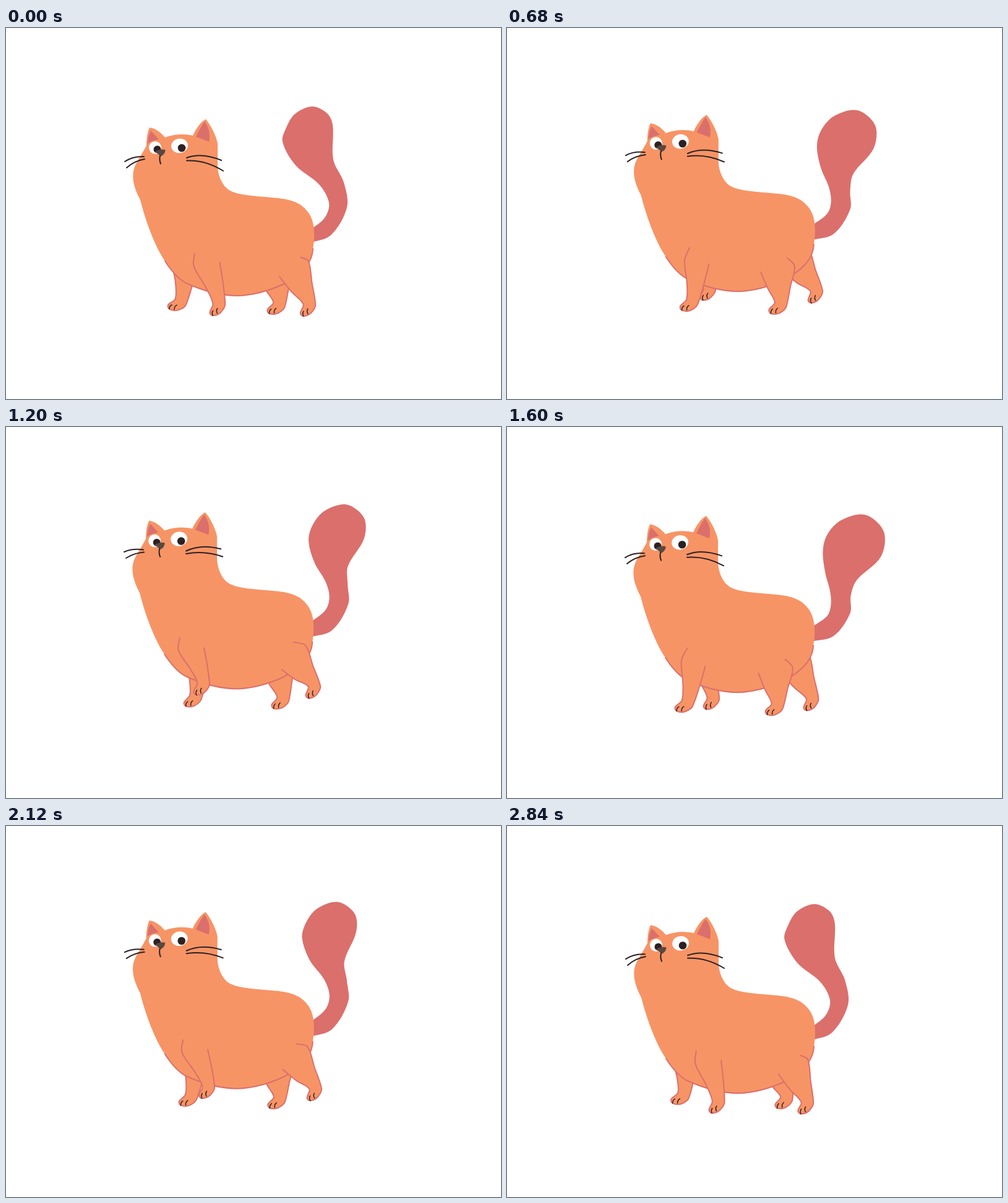
Recreate the animation shown at these times as an HTML page. Size 800 by 600 pixels, loop 2880 ms.

```html
<!DOCTYPE html>
<html lang="en">
<head>
<meta charset="utf-8">
<title>Walking cat</title>
<style>
  html, body { margin: 0; width: 100%; height: 100%; overflow: hidden; background: #fff; }
  svg { display: block; width: 100vw; height: 100vh; }
  .fur { fill: #f79465; }
  .pink { fill: #db6f6c; }
  .dark { fill: #2b2124; }
  .edge { stroke: #db6f6c; stroke-width: 2; stroke-linecap: round; stroke-linejoin: round; }
  .ink { fill: none; stroke: #2b2124; stroke-width: 2; stroke-linecap: round; }
  .claw { stroke-width: 1.5; }
  .line { fill: none; }
</style>
</head>
<body>
<svg viewBox="0 0 800 600">
  <g id="cat">
    <path id="tail" class="pink"/>
    <g id="farLegs"></g>
    <path class="fur" d="M232 161C229 167 227 178 227 190C222 200 214 212 209 222C202 237 205 256 217 278C227 318 243 357 257 377C266 391 276 404 290 412C318 425 345 433 375 433C400 432 425 425 449 414C470 402 495 385 496 357C500 335 499 310 487 296.500C476 281 456 276 430 274.200C400 271.500 378 271 362 263C348 255 342 235 342 222L342 187C340 175 331 157 323 147.500C315 151 307 163 302 174C290 171 272 171 257 177C251 170 242 162 232 161Z"/>
    <path class="edge line" d="M257 377C266 391 276 404 290 412C318 425 345 433 375 433C400 432 425 425 449 414C470 402 495 385 496 357"/>
    <path class="pink" d="M234 166C231 172 229 179 229 187C234 183 240 181 247 180C243 176 239 171 234 166ZM321 151C316 158 311 167 307 176C314 178 321 181 328 184C331 172 328 161 321 151Z"/>
    <ellipse cx="241" cy="193.500" rx="10" ry="10.300" fill="#fff"/>
    <ellipse cx="280.500" cy="190.500" rx="13.500" ry="11.700" fill="#fff" transform="rotate(-10 280.500 190.500)"/>
    <circle class="dark" cx="244.500" cy="196.300" r="6"/>
    <circle class="dark" cx="284" cy="194" r="6.300"/>
    <path d="M240.500 200.500C245 197 251 195.500 257.500 197C257.500 202 254 206.500 249.500 207.500C247 204 244 202 240.500 200.500Z" fill="#594841"/>
    <path class="ink" d="M249 206.500C248 211 248.500 216 250 219.500"/>
    <path id="whiskers" class="ink"/>
    <g id="nearLegs"></g>
  </g>
</svg>
<script>
const LOOP = 2880, STRIDE = 960, STEP = 40;

// Tail outline: each point swung fully left, then fully right
const TAIL = [
  [490,348, 490,352], [525,335, 530,345], [551,290, 557,316], [546,250, 560,295],
  [529,213, 578,274], [528,157, 631,241], [519,138, 640,193], [495,127, 608,161],
  [467,139, 565,169], [453,161, 540,193], [447,184, 533,221], [468,222, 531,254],
  [506,253, 529,285], [522,283, 525,304], [515,307, 519,316], [490,328, 490,333]
];
const PAW = [[-11, 10], [-10, 16], [0, 19], [10, 16], [17, 10]];
const CLAWS = [[[-5, 10], [-9, 12], [-9, 17]], [[3, 10], [-1, 12], [-1, 17]]];

// Whisker root, control point, tip, and the rise of the tip at full lift
const WHISKERS = [
  [[292, 210], [316, 201], [348, 214], 8],
  [[292, 214.5], [322, 213], [351, 231], 13],
  [[223, 208], [205, 207], [192, 216], 5],
  [[224, 212], [207, 215], [195, 226], 5]
];

const $ = id => document.getElementById(id);
const mix = (a, b, u) => a.map((v, k) => v + (b[k] - v) * u);
const shift = (p, x, y) => [p[0] + x, p[1] + y];
const dist = (a, b) => Math.hypot(a[0] - b[0], a[1] - b[1]);
const fmt = p => p.map(v => v.toFixed(2)).join(" ");

// Smooth open curve through all points, handles scaled to their spacing
function spline(pts) {
  let d = "M" + fmt(pts[0]);
  for (let i = 0; i < pts.length - 1; i++) {
    const a = pts[i], b = pts[i + 1];
    const before = pts[i - 1] || a, after = pts[i + 2] || b;
    const len = dist(a, b);
    const ka = len / (len + dist(before, a)) / 3;
    const kb = len / (len + dist(b, after)) / 3;
    const c1 = a.map((v, k) => v + (b[k] - before[k]) * ka);
    const c2 = b.map((v, k) => v - (after[k] - a[k]) * kb);
    d += "C" + [c1, c2, b].map(fmt).join(" ");
  }
  return d;
}

// Cosine over one stride with its crest at the given time
const wave = (time, crest) => Math.cos(2 * Math.PI * (time - crest) / STRIDE);

// Height of a foot in the air: quick lift, slow landing
function airborne(phase) {
  const u = (phase - 155) / 345;
  return u > 0 && u < 1 ? Math.sin(Math.PI * u ** 0.7) : 0;
}

// Each leg: points before the ankle, the ankle, the paw angle, and points after the heel
function frontLeg(phase, depth) {
  const c = wave(phase, 30), up = airborne(phase), bend = c + 0.6 * up;
  const shoulder = [293 + 13 * wave(phase, -70) - 6 * up, 363 + 2 * c - 14 * up];
  const armpit = shift(shoulder, 34 + 7 * bend, 23 - 9 * bend);
  const bulge = shift(shoulder, -6 + 5 * bend, 20);
  const ankle = [304 + 31 * c, 446 - 24 * up - depth * (1 - c)];
  return {
    ankle, angle: -12 - 16 * bend,
    front: [shoulder, bulge, shift(mix(bulge, ankle, 0.6), 2, 0)],
    back: heel => [shift(mix(armpit, heel, 0.5), 1, 0), armpit]
  };
}

function rearLeg(phase, depth) {
  const c = wave(phase, 85), up = airborne(phase), bend = c + 0.6 * up;
  const groin = [425 + 20 * bend, 402];
  const hip = [464 + 15 * bend - 16 * up, 375 - 5 * bend - 13 * up];
  const rump = shift(hip, 12 + 8 * up, 10 - 4.5 * bend);
  const ankle = [455 + 30 * c + 20 * up, 449 - 2.5 * c - 20 * up - depth * (1 - c)];
  return {
    ankle, angle: -18 - 13 * bend,
    front: [groin, shift(mix(groin, ankle, 0.5), 0, 2)],
    back: heel => [mix(rump, heel, 0.5), rump, hip]
  };
}

function makeLeg(layer, pose, offset, depth) {
  const add = cls => {
    const path = document.createElementNS("http://www.w3.org/2000/svg", "path");
    path.setAttribute("class", cls);
    return $(layer).appendChild(path);
  };
  const limb = add("fur edge"), claws = add("ink claw");
  return phase => {
    const { ankle, angle, front, back } = pose((phase + offset) % STRIDE, depth);
    const c = Math.cos(angle * Math.PI / 180), s = Math.sin(angle * Math.PI / 180);
    const place = ([x, y]) => shift(ankle, x * c - y * s, x * s + y * c);
    const paw = PAW.map(place);
    limb.setAttribute("d", spline([...front, ankle, ...paw, ...back(paw[paw.length - 1])]));
    claws.setAttribute("d", CLAWS.map(claw => {
      const [a, b, e] = claw.map(place).map(fmt);
      return `M${a}Q${b} ${e}`;
    }).join(""));
  };
}

const legs = [
  makeLeg("farLegs", rearLeg, STRIDE / 2, 2.5),
  makeLeg("farLegs", frontLeg, STRIDE / 2, 2.5),
  makeLeg("nearLegs", rearLeg, 0, 0),
  makeLeg("nearLegs", frontLeg, 0, 0)
];

// The tail rises in an arc between its two extremes; its root stays low
function tailPath(u) {
  const arc = 36 * u * (1 - u);
  return spline(TAIL.map(([x0, y0, x1, y1]) => {
    const [x, y] = mix([x0, y0], [x1, y1], u);
    return [x, y - arc * Math.min(1, Math.max(0, (350 - y) / 60))];
  })) + "Z";
}

function whiskerPath(lift) {
  return WHISKERS.map(([root, control, tip, rise]) => {
    const bent = shift(control, 0, -rise * lift * 0.35);
    return `M${fmt(root)}Q${fmt(bent)} ${fmt(shift(tip, 0, -rise * lift))}`;
  }).join("");
}

function draw(time) {
  const phase = time % STRIDE;
  const lag = 40 * (1 - wave(phase, 0));
  const rise = (1 - wave(2 * (phase - lag), 0)) / 2;
  const sway = Math.sin(Math.PI * time / LOOP) ** 4;
  $("cat").setAttribute("transform", `translate(${fmt([-sway, -10.2 * rise])})`);
  $("tail").setAttribute("d", tailPath((1 - wave(phase, 0)) / 2));
  $("whiskers").setAttribute("d", whiskerPath(rise ** 1.5));
  legs.forEach(leg => leg(phase));
}

const start = performance.now();
function tick() {
  const elapsed = performance.now() - start;
  draw(Math.floor(elapsed / STEP) * STEP % LOOP);
  requestAnimationFrame(tick);
}
tick();
</script>
</body>
</html>
```
